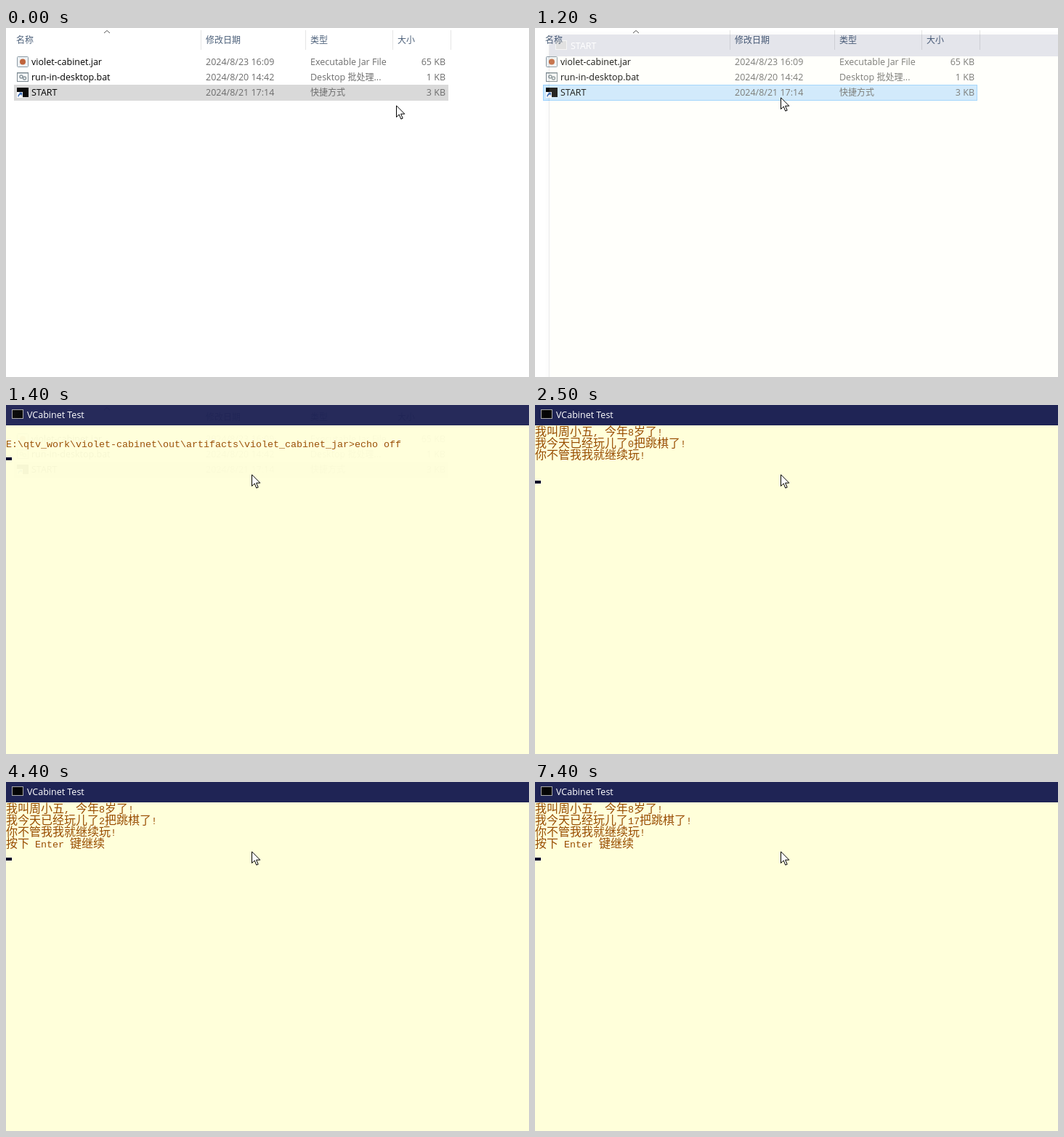
These frames come from a looping animation (720x480 px, 8000 ms). An HTML page:

```html
<!DOCTYPE html>
<html lang="zh-CN">
<head>
<meta charset="utf-8">
<title>Console demo</title>
<style>
html, body { margin: 0; width: 100%; height: 100%; overflow: hidden; }
body { position: relative; background: #fff; font: 12px/21px "Noto Sans CJK SC", "Noto Sans CJK", sans-serif; }
div, svg { position: absolute; }
.stage { inset: 0; overflow: hidden; }
.stage * { white-space: pre; }

/* File list */
.head div { top: 3px; height: 27px; line-height: 26px; color: #4c607a; }
.head .rule { width: 1px; background: #e5e5e5; }
.row { left: 11px; width: 598px; height: 22px; box-sizing: border-box; color: #6d6d6d; }
.row div { top: 0; height: 21px; }
.latin { font-family: "Open Sans", "Noto Sans", "Noto Sans CJK SC", sans-serif; font-size: 12.5px; }
.row .name { left: 24px; color: #000; }
.row .date { left: 264px; }
.row .type { left: 408px; }
.row .size { right: 4px; }
.row svg { left: 4px; top: 3px; }
.fill { left: 11px; top: 78px; width: 598px; height: 22px; box-sizing: border-box; background: #d9d9d9; border: 1px solid #d9d9d9; }

/* Console window */
.window {
  left: -1px; top: -2px; width: 900px; height: 700px; box-sizing: border-box;
  border-left: 1px solid #555; background: #ffffda; box-shadow: 0 0 8px #0005;
}
.title { left: 0; top: 0; width: 100%; height: 30px; background: #1f2455; color: #fff; }
.title .latin { left: 29px; top: 5px; }
.title svg { left: 8px; top: 8px; }
.text { left: 0; top: 29px; font-size: 16px; font-weight: 300; line-height: 16px; color: #984c00; }
.text div { left: 0; top: 0; height: 16px; }
.text i { font: 13.333px/0 "Liberation Mono", monospace; }
.text .l2 { top: 16px; }
.text .l3 { top: 32px; }
.text .l4 { top: 48px; }
.count::after { content: "0"; }
.caret { left: 0; width: 8px; height: 4px; background: #000028; }

/* Timing: one 8 s loop of hard steps, 1.25% = 100 ms */
.pointer, .fill, .window, .launch, .ready, .echo, .story, .prompt, .caret, .count::after {
  animation: 8s step-end infinite;
}
.pointer { left: 0; top: 0; animation-name: move; }
.fill { animation-name: select; }
.window { animation-name: open; }
.launch { animation-name: launch; }
.ready { animation-name: ready; }
.echo { animation-name: echo; }
.story { animation-name: story; }
.prompt { animation-name: prompt; }
.caret { animation-name: blink; }
.count::after { animation-name: count; }

@keyframes move {
  0% { transform: translate(537px, 106px); }
  1.25% { transform: translate(510px, 119px); }
  2.5% { transform: translate(458px, 125px); }
  3.75% { transform: translate(400px, 118px); }
  5% { transform: translate(352px, 102px); }
  6.25%, 100% { transform: translate(338px, 95px); }
}
@keyframes select {
  0%, 16.25%, 100% { background: #d9d9d9; border-color: #d9d9d9; }
  6.25% { background: #cce8ff; border-color: #99d1ff; }
}
@keyframes open {
  0% { opacity: 0; transform: translate(20px, 11px); }
  15% { opacity: .12; transform: translate(20px, 11px); }
  16.25% { opacity: .72; transform: translate(6px, 3px); }
  17.5% { opacity: .97; transform: none; }
  18.75%, 100% { opacity: 1; transform: none; }
}
@keyframes launch {
  0% { opacity: 1; }
  16.25%, 100% { opacity: 0; }
}
@keyframes ready {
  0% { opacity: 0; }
  16.25%, 100% { opacity: 1; }
}
@keyframes echo {
  0%, 18.75%, 100% { opacity: 0; }
  16.25% { opacity: 1; }
}
@keyframes story {
  0%, 42.5% { opacity: 0; }
  18.75%, 43.75%, 100% { opacity: 1; }
}
@keyframes prompt {
  0% { opacity: 0; }
  43.75%, 100% { opacity: 1; }
}
@keyframes blink {
  0% { top: 74px; }
  18.75%, 100% { top: 106px; }
  0%, 27.5%, 40%, 51.25%, 63.75%, 76.25%, 87.5% { opacity: 0; }
  16.25%, 31.25%, 43.75%, 55%, 67.5%, 80%, 92.5%, 100% { opacity: 1; }
}
@keyframes count {
  0% { content: "0"; }
  43.75% { content: "1"; }
  55% { content: "2"; }
  67.5% { content: "7"; }
  80% { content: "12"; }
  92.5%, 100% { content: "17"; }
}
</style>
</head>
<body>
<div class="stage">
  <div class="head">
    <div style="left:14px">名称</div>
    <div style="left:275px">修改日期</div>
    <div style="left:419px">类型</div>
    <div style="left:539px">大小</div>
    <div class="rule" style="left:268px"></div>
    <div class="rule" style="left:412px"></div>
    <div class="rule" style="left:532px"></div>
    <div class="rule" style="left:612px"></div>
    <svg style="left:134px;top:2px" width="10" height="6"><path d="M1 5 5 1.5 9 5" fill="none" stroke="#555"/></svg>
  </div>
  <div class="fill"></div>

  <div class="row latin" style="top:36px">
    <svg width="16" height="15"><rect x=".5" y=".5" width="15" height="14" rx="1" fill="#eef2f5" stroke="#8b9aa5"/><circle cx="8" cy="7.5" r="4" fill="#c0643c"/></svg>
    <div class="name">violet-cabinet.jar</div>
    <div class="date">2024/8/23 16:09</div>
    <div class="type">Executable Jar File</div>
    <div class="size">65 KB</div>
  </div>
  <div class="row latin" style="top:57px">
    <svg width="16" height="15"><rect x=".5" y="1.5" width="15" height="12" fill="#f7f9fa" stroke="#7d8a92"/><path d="M1 2.5H15" stroke="#b9c4ca"/><g fill="none" stroke="#89959c" stroke-width="1.5"><circle cx="6" cy="7" r="2"/><circle cx="10.5" cy="9" r="2"/></g></svg>
    <div class="name">run-in-desktop.bat</div>
    <div class="date">2024/8/20 14:42</div>
    <div class="type">Desktop <span style="font-size:12px">批处理</span>...</div>
    <div class="size">1 KB</div>
  </div>
  <div class="row latin" style="top:78px">
    <svg style="top:4px" width="16" height="15"><rect width="16" height="13" fill="#0a0a0a"/><rect y="6" width="8" height="8" fill="#fff"/><path d="M2 12.5Q2 9 5.5 9M3.5 7.5H6.5V10.5" fill="none" stroke="#2a5fb0" stroke-width="1.3"/></svg>
    <div class="name">START</div>
    <div class="date">2024/8/21 17:14</div>
    <div class="type" style="font-size:12px">快捷方式</div>
    <div class="size">3 KB</div>
  </div>

  <div class="window">
    <div class="title">
      <svg width="16" height="13"><rect x=".5" y=".5" width="15" height="12" fill="#050505" stroke="#a8a8a8"/></svg>
      <div class="latin launch">START</div>
      <div class="latin ready">VCabinet Test</div>
    </div>
    <div class="text echo"><div class="l2"><i>E:\qtv_work\violet-cabinet\out\artifacts\violet_cabinet_jar&gt;echo off</i></div></div>
    <div class="text story">
      <div>我叫周小五<i>, </i>今年<i>8</i>岁了<i>!</i></div>
      <div class="l2">我今天已经玩儿了<i class="count"></i>把跳棋了<i>!</i></div>
      <div class="l3">你不管我我就继续玩<i>!</i></div>
      <div class="l4 prompt">按下<i> Enter </i>键继续</div>
    </div>
    <div class="caret"></div>
  </div>

  <svg class="pointer" width="14" height="21"><path d="M.5.8V16.6L4.2 13 6.8 19.2 9.2 18.2 6.6 12.2H11.8Z" fill="#fff" stroke="#000"/></svg>
</div>
</body>
</html>
```
